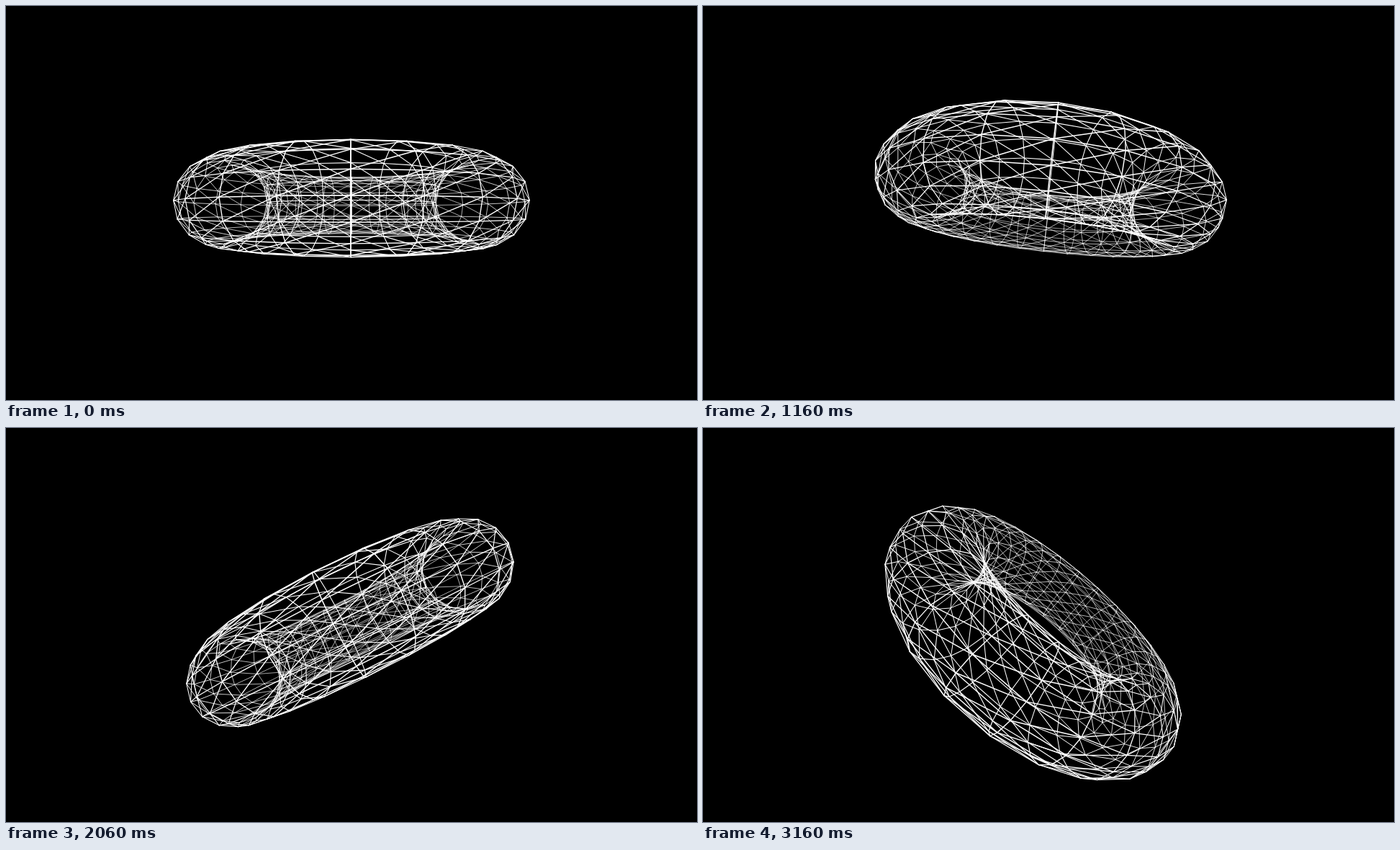
These frames come from a looping animation (960 by 547 pixels, 3260 ms). An HTML page with a canvas:

```html
<!DOCTYPE html>
<html lang="en">
<head>
<meta charset="utf-8">
<title>Wireframe torus</title>
<style>
  html, body { margin: 0; width: 100%; height: 100%; overflow: hidden; background: #000; }
  canvas { display: block; }
</style>
</head>
<body>
<canvas id="stage" width="960" height="547"></canvas>
<script>
const LOOP = 3260;
const WIDTH = 960, HEIGHT = 547;
const FOCAL = HEIGHT / 2 / Math.tan(Math.PI / 6);
const RING = 0.3518, TUBE = 0.1115;   // radii relative to the camera distance
const RING_SEGMENTS = 24, TUBE_SEGMENTS = 16;
const STROKE = 0.82;
const TAU = Math.PI * 2, DEG = Math.PI / 180;

// Bursts of evenly spaced steps: [first ms, last ms, count]
const bursts = [[0, 0, 1], [70, 540, 7], [660, 1160, 7], [1240, 1740, 7],
                [1820, 2320, 7], [2390, 2870, 7], [2990, 3160, 3]];
const stepTimes = bursts.flatMap(([first, last, count]) =>
  Array.from({ length: count }, (_, i) => first + (last - first) * i / Math.max(1, count - 1)));

// The tilt spirals outwards: [step, tilt amount, tilt heading, spin], in degrees
const poses = [
  [0, -1.5, -90, -0.2],
  [8, 6.8, -14.4, 1.8],
  [14, 14.5, 63.4, -0.4],
  [18, 19.6, 104.7, -0.5],
  [25, 26.5, 176.1, -3.1],
  [33, 35.3, 270, -1.5],
  [38, 45.9, 333.2, 7]
];

function slope(k, col) {
  const a = poses[Math.max(0, k - 1)], b = poses[Math.min(poses.length - 1, k + 1)];
  return (b[col] - a[col]) / (b[0] - a[0]);
}

function poseValue(step, col) {
  let k = 0;
  while (k < poses.length - 2 && step >= poses[k + 1][0]) k++;
  const a = poses[k], b = poses[k + 1], span = b[0] - a[0];
  const u = (step - a[0]) / span, u2 = u * u, u3 = u2 * u;
  return a[col] * (2 * u3 - 3 * u2 + 1) + b[col] * (3 * u2 - 2 * u3)
    + span * (slope(k, col) * (u3 - 2 * u2 + u) + slope(k + 1, col) * (u3 - u2));
}

function projector(step) {
  const tilt = poseValue(step, 1), heading = poseValue(step, 2) * DEG;
  const spin = poseValue(step, 3) * DEG;
  const roll = tilt * Math.cos(heading) * DEG, pitch = tilt * Math.sin(heading) * DEG;
  const cr = Math.cos(roll), sr = Math.sin(roll);
  const cp = Math.cos(pitch), sp = Math.sin(pitch);
  return (i, j) => {
    const around = j / RING_SEGMENTS * TAU + spin, phi = i / TUBE_SEGMENTS * TAU;
    const radius = RING + TUBE * Math.cos(phi), height = TUBE * Math.sin(phi);
    const x = radius * Math.sin(around), z = radius * Math.cos(around);
    const y = height * cp + z * sp;
    const depth = 1 - (z * cp - height * sp);
    return {
      x: WIDTH / 2 + FOCAL * (x * cr + y * sr) / depth,
      y: HEIGHT / 2 - FOCAL * (y * cr - x * sr) / depth,
      depth
    };
  };
}

const ctx = document.getElementById('stage').getContext('2d');

function line(a, b) {
  ctx.lineWidth = STROKE * 2 / (a.depth + b.depth);
  ctx.beginPath();
  ctx.moveTo(a.x, a.y);
  ctx.lineTo(b.x, b.y);
  ctx.stroke();
}

function draw(step) {
  const project = projector(step);
  ctx.fillStyle = '#000';
  ctx.fillRect(0, 0, WIDTH, HEIGHT);
  ctx.strokeStyle = '#fff';
  ctx.lineCap = 'round';
  for (let i = 0; i < TUBE_SEGMENTS; i++) {
    for (let j = 0; j < RING_SEGMENTS; j++) {
      const corner = project(i, j);
      line(corner, project(i, j + 1));
      line(corner, project(i + 1, j));
      line(corner, project(i + 1, j + 1));
    }
  }
}

const start = performance.now();
let shown = -1;

function tick() {
  const t = (performance.now() - start) % LOOP;
  // Step times are rounded to 10 ms, so allow for that much.
  const step = stepTimes.filter(time => time <= t + 11).length - 1;
  if (step !== shown) draw(shown = step);
  requestAnimationFrame(tick);
}
tick();
</script>
</body>
</html>
```
